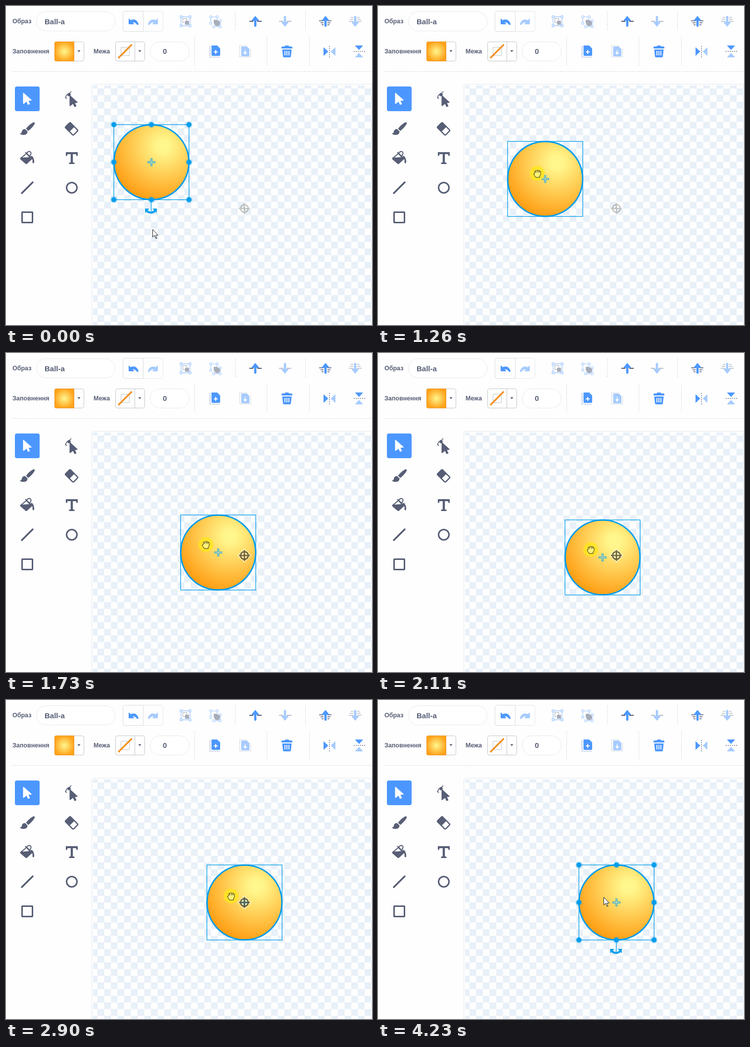
An HTML page for the animation above (4320 ms loop, 740 px wide and 646 px high).

```html
<!DOCTYPE html>
<html lang="uk">
<head>
<meta charset="utf-8">
<title>Centering a costume</title>
<style>
  html, body { margin: 0; width: 100%; height: 100%; overflow: hidden; background: #fefefe; }
  svg { display: block; }
  text { font: bold 12.5px "Liberation Sans", Arial, sans-serif; fill: #575e75; }
  .value { font-size: 15px; }
  .field { fill: #fff; stroke: #e6e9ee; }
  .button { fill: none; stroke: #c4c6ca; }
  .dashed { fill: none; stroke: #d6d8dc; stroke-dasharray: 3 2; }
  .ink { fill: #575e75; }
  .line { fill: none; stroke: #575e75; stroke-width: 3; }
  .blue { fill: #4c97ff; }
  .pale { fill: #a6cbff; }
  .guide { fill: none; stroke: #009dec; }
</style>
</head>
<body>
<svg width="740" height="646" viewBox="0 0 740 646">
  <defs>
    <pattern id="checks" patternUnits="userSpaceOnUse" x="482" y="410" width="27" height="27">
      <path d="M0 0H13.5V27H27V13.5H0Z" fill="#e8f0f8"/>
    </pattern>
    <radialGradient id="swatch">
      <stop offset="0" stop-color="#fff78f"/><stop offset="1" stop-color="#ffa41c"/>
    </radialGradient>
    <radialGradient id="shade" gradientUnits="userSpaceOnUse" cx="24" cy="-33" r="115">
      <stop offset="0" stop-color="#fff88e"/><stop offset=".12" stop-color="#fff58a"/>
      <stop offset="1" stop-color="#ff9c12"/>
    </radialGradient>
    <marker id="handle" markerUnits="userSpaceOnUse" markerWidth="16" markerHeight="16" viewBox="-8 -8 16 16">
      <circle r="7" fill="#009dec" opacity=".25"/><circle r="5" fill="#009dec"/>
    </marker>
    <path id="up" d="M0-11 7-2.5Q7.5-1 6-1H2.3V9Q2.3 11 0 11T-2.3 9V-1H-6Q-7.5-1-7-2.5Z"/>
    <path id="undo" d="M248 26.5Q248 25 249.3 26L252 28.7Q263 23.5 268 36Q268 39.5 265 38Q261 32.5 256 33L258.5 35.5Q259.5 37 258 37H249Q248 37 248 36Z"/>
    <path id="caret" d="M-3-2H3L0 2Z" fill="#575e75"/>
    <path id="pointer" d="M.5.5V16L4.1 12.6 6.7 18.6H9.1L6.5 12.2H11.5Z"/>
    <path id="corners" d="M-11-11h4v4h-4zM7-11h4v4h-4zM-11 7h4v4h-4zM7 7h4v4h-4zM-7-9H7M-7 9H7M-9-7V7M9-7V7"/>
    <path id="crosshair" d="M-7.8 0A7.8 7.8 0 1 1 7.8 0A7.8 7.8 0 1 1-7.8 0M-11 0H11M0-11V11" fill="none"/>
    <g id="target">
      <use href="#crosshair" stroke="#fff" stroke-width="6" stroke-linecap="round" opacity=".6"/>
      <use href="#crosshair" stroke="#3c3a2c" stroke-width="2.7"/>
    </g>
  </defs>

  <!-- top bar, first row -->
  <text x="13" y="35">Образ</text>
  <rect class="field" x="61.5" y="11.5" width="159" height="39" rx="19.5"/>
  <text class="value" x="78" y="37">Ball-a</text>
  <path class="button" d="M277.5 10.5H241Q236.5 10.5 236.5 15V47Q236.5 51.5 241 51.5H277.5Z" style="stroke:#d9dbe0"/>
  <path class="button" d="M277.5 10.5H313Q317.5 10.5 317.5 15V47Q317.5 51.5 313 51.5H277.5" style="stroke:#e6e8ec"/>
  <use href="#undo" class="blue"/>
  <use href="#undo" class="pale" transform="matrix(-1 0 0 1 555 0)"/>

  <g transform="translate(363 31)">
    <use href="#corners" fill="#fff" stroke="#a6cbff" stroke-width="1.3"/>
    <rect x="-5.5" y="-5.5" width="8" height="8" fill="#fff" stroke="#a8adba"/>
    <path d="M-1-1H7V7H-1Z" fill="#a8adba"/>
  </g>
  <g transform="translate(423 31)" stroke="#a6cbff" stroke-width="1.2" fill="#fff">
    <path d="M-11-11h4v4h-4zM2-11h4v4h-4zM-11 2h4v4h-4zM-7-9H2M-9-7V2M4-7V-3M8-3h4v4h-4zM8 9h4v4h-4zM-5 9h4v4h-4zM-1 11H8M10 1V9"/>
    <path d="M-3-3H4V-2A6 6 0 1 1-2 4H-3Z" fill="#a8adba" stroke="none"/>
  </g>

  <g transform="translate(504 31)">
    <path d="M-12 0H-4M4 0H13" class="line" style="stroke-width:2"/><use href="#up" class="blue"/>
  </g>
  <g transform="translate(564 31)">
    <path d="M-12 0H-4M4 0H13" stroke="#b9bfcc" stroke-width="2"/><use href="#up" class="pale" transform="scale(1 -1)"/>
  </g>
  <g transform="translate(646 31)">
    <path d="M-13-1H-4M4-1H12M-10 3H-4M4 3H10M-8 7H-4M4 7H8" class="line" style="stroke-width:1.5"/>
    <use href="#up" class="blue"/>
  </g>
  <g transform="translate(706 31)">
    <path d="M-13 0H-4M4 0H13M-11-4H-4M4-4H11M-9-8H-4M4-8H9" stroke="#b9bfcc" stroke-width="1.5"/>
    <use href="#up" class="pale" transform="scale(1 -1)"/>
  </g>

  <!-- top bar, second row -->
  <text x="13" y="96">Заповнення</text>
  <rect class="button" x="98.5" y="72.5" width="59" height="39" rx="4"/>
  <path d="M138 72H102Q98 72 98 76V108Q98 112 102 112H138Z" fill="url(#swatch)"/>
  <path d="M137.500 72.500H102Q98.500 72.500 98.500 76V108Q98.500 111.500 102 111.500H137.500Z" fill="none" stroke="#e8901c"/>
  <use href="#caret" x="147.5" y="91.5"/>
  <text x="177" y="96">Межа</text>
  <rect class="button" x="221.5" y="72.5" width="59" height="39" rx="4"/>
  <path class="button" d="M260.5 72V112M232.5 83.5H249.5V100.5H232.5Z"/>
  <path d="M227 105.5 254.5 78" stroke="#f29022" stroke-width="3.2"/>
  <use href="#caret" x="270.5" y="91.5"/>
  <rect class="field" x="291.5" y="72.5" width="79" height="39" rx="19.5"/>
  <text class="value" x="317" y="97">0</text>

  <path class="blue" d="M416 80H427L433 86V99Q433 101 431 101H417.500Q415.500 101 415.500 99V80.500Z"/>
  <path d="M412.500 82V103.500H433" class="line" style="stroke:#6f8fc4;stroke-width:1.2;stroke-dasharray:2 1.500"/>
  <path d="M420 93H428M424 89V97" stroke="#fff" stroke-width="2"/>
  <path class="pale" d="M477 82H487L492 87V101Q492 102 491 102H477Q475.500 102 475.500 101V83Q475.500 82 477 82Z"/>
  <path d="M487 80.500H472.500V103.500H494.500V86" class="line" style="stroke:#bcc3d2;stroke-width:1.2;stroke-dasharray:2 1.500"/>
  <path d="M483.500 89V95M481 94.500H486L483.500 97.500Z" stroke="#fff" stroke-width="1.500" fill="#fff"/>
  <path class="blue" d="M557 84Q557 82 559 82H563L565 80H571L573 82H577Q579 82 579 84V86H557ZM558.5 88H577.5L576 102Q575.8 104 574 104H562Q560.2 104 560 102Z"/>
  <path d="M564 91V100M568 91V100M572 91V100" stroke="#fff" stroke-width="1.8"/>
  <path class="blue" d="M642 83.5V101L651.5 92.2ZM705.5 80H722L713.8 89Z"/>
  <path class="pale" d="M666 83.5V101L656.5 92.2ZM705.5 104H722L713.8 95Z"/>
  <path d="M654 81V104M703 92H726" stroke="#8f95a5" stroke-width="2" stroke-dasharray="2 2.2"/>

  <path class="dashed" d="M463.5 11V51M605.5 11V51M381.5 63V120M527.5 63V120M613.5 63V120M13 132.5H740"/>

  <!-- tools -->
  <rect class="blue" x="18" y="163" width="50" height="50" rx="4"/>
  <path d="M34.5 177Q34.5 175 36 176.2L51.5 190Q52.5 191.3 51 191.5L45.5 192 48.5 198.5 44.5 200.3 41.5 193.8 36.3 197.8Q34.5 199 34.5 197Z" fill="#fff"/>
  <path class="ink" d="M128.5 182Q128.5 180 130 181.2L144.5 194.5Q145.5 195.8 144 196L139.5 196.5 142.5 203 138.5 204.8 135.5 198.3 130.3 202.3Q128.5 203.5 128.5 201.5Z"/>
  <path d="M121 186Q121 179 127 178.5M127 178 132 173M119.5 185 123 188" class="line" style="stroke-width:1.5"/>
  <circle cx="127.5" cy="179.5" r="3.3" class="ink"/>

  <path class="ink" d="M57 235.5Q59 236.5 57.5 239.5 52 248 45 253L40.5 248.5Q46 241 53.5 236.5 56 235 57 235.5ZM39 249.5 43.5 254Q43.5 261 36 261 31 261.5 28 258.5 32 257.5 32 254 34 248.5 39 249.5Z"/>
  <g transform="rotate(45 133 248.5)">
    <rect class="line" x="121.5" y="242" width="23" height="14" rx="2" style="stroke-width:2.5"/>
    <path class="ink" d="M121 241H134V257H121Z"/>
  </g>
  <path class="ink" d="M28.5 308 42 297 54 309 42.5 319.5Q41 320.5 39.5 319.5L29 310.5ZM52 303Q57.5 308 57 317 56 320 53.5 317 54.5 310 50 305Z"/>
  <path d="M33 307 42 299.5 48 306Z" fill="#fff"/>
  <path d="M39 296 49 307M41 299Q46 292 50 296 52 299 47 305" class="line" style="stroke-width:2"/>
  <path class="ink" d="M121 296H145V303.5H142.5L141.5 300H135.2V316.5L138.5 317.5V320H127.5V317.5L130.8 316.5V300H124.5L123.5 303.5H121Z"/>
  <path class="line" d="M32 379 54 357" stroke-linecap="round" style="stroke-width:3.5"/>
  <circle class="line" cx="133" cy="368" r="10.5"/>
  <rect class="line" x="32.5" y="417.5" width="21" height="21" rx=".5"/>

  <!-- drawing area -->
  <path d="M173.5 646V163Q173.5 158.5 178 158.5H740" fill="none" stroke="#e3e7ed"/>
  <rect x="176" y="161" width="564" height="485" fill="url(#checks)"/>
  <use href="#target" x="482" y="410" opacity=".28"/>

  <circle id="ball" r="76" fill="url(#shade)"/>
  <g id="selection">
    <circle class="guide" r="75.8" stroke-width="3"/>
    <rect class="guide" x="-76" y="-76" width="152" height="152" stroke-width="1.3"/>
    <path class="guide" d="M-8 0H8M0-8V8" stroke-width="4" opacity=".8"/>
    <path d="M-7 0H7M0-7V7" stroke="#d6dfae" stroke-width="1.3"/>
    <g id="handles">
      <path class="guide" d="M-.5 76V100" stroke-width="1.3"/>
      <path class="guide" d="M-9 99Q-1 105.5 7 99" stroke-width="4"/>
      <path d="M-13 94H-4.5L-12.5 103ZM11 94H2.5L10.5 103Z" fill="#009dec"/>
      <path d="M-76-76H0H76V0V76H0H-76V0Z" fill="none" marker-start="url(#handle)" marker-mid="url(#handle)"/>
    </g>
  </g>
  <use id="highlight" href="#target" x="482" y="410"/>

  <g id="cursor" fill="#fff">
    <circle id="press" r="15" fill="#ffe520" opacity=".85"/>
    <use id="point" href="#pointer" stroke="#1c1c1c"/>
    <path id="grab" d="M-3 8-7 2Q-7.5-.5-5 0V-4Q-4-6.5-2.5-5-1-8 1-5.5 3-7.5 4-5 7-5.5 7-2V2L5 5V8ZM-2.5-5V-1.5M1-5.5V-1.5M4-5V-1.5" stroke="#2a2610"/>
  </g>
</svg>
<script>
const LOOP = 4320, PRESS = 790, RELEASE = 3680;
const CENTER = [482, 410];
const $ = id => document.getElementById(id);

// The picture only refreshes at these moments, in ms.
const range = (start, step, count) => Array.from({ length: count }, (_, i) => start + i * step);
const moments = [0, ...range(90, 81.5, 7), ...range(PRESS, 77.6, 22), 2740, 2900, RELEASE, 4070, 4230];

// Tracks of [time, x, y].
const ballTrack = [
  [790, 294, 316.3], [1023, 304, 324], [1255.6, 338, 350.2], [1488, 391, 382], [1721, 429, 404],
  [1799, 434.5, 407.5], [2109, 454, 414], [2342, 472, 414], [2419, 477, 414], [2740, 482.2, 410]
];
const cursorTrack = [
  [0, 296, 452], [170, 292, 428], [420, 273, 328], [579, 268, 301], [790, 268, 301],
  [1023, 281, 309], [1255.6, 322, 339], [1488, 369, 368], [1721, 404, 388], [1799, 409, 391],
  [2109, 430, 398], [2342, 447, 399], [2419, 452, 399], [2740, 453, 397], [2900, 455, 397],
  [3680, 455, 397], [4070, 456, 397], [4230, 456, 399]
];

function at(track, time) {
  const next = track.findIndex(key => key[0] > time);
  if (next < 0) return track[track.length - 1].slice(1);
  if (next === 0) return track[0].slice(1);
  const [t0, x0, y0] = track[next - 1], [t1, x1, y1] = track[next];
  const k = (time - t0) / (t1 - t0);
  return [x0 + (x1 - x0) * k, y0 + (y1 - y0) * k];
}

const place = (id, [x, y]) => $(id).setAttribute('transform', `translate(${x} ${y})`);
const show = (id, visible) => $(id).setAttribute('display', visible ? 'inline' : 'none');

function draw(now) {
  const elapsed = now % LOOP;
  const time = moments.filter(m => m <= elapsed).pop();
  const ball = at(ballTrack, time);
  const pressed = time >= PRESS && time < RELEASE;
  const dragging = pressed && time > PRESS;

  place('ball', ball);
  place('selection', ball);
  place('cursor', at(cursorTrack, time));
  $('cursor').setAttribute('fill', pressed ? '#fff27a' : '#fff');
  show('handles', !pressed);
  show('press', pressed);
  show('grab', dragging);
  show('point', !dragging);

  const distance = Math.hypot(ball[0] - CENTER[0], ball[1] - CENTER[1]);
  const nearness = Math.min(1, Math.max(0, (90 - distance) / 30));
  $('highlight').setAttribute('opacity', pressed ? 0.75 * nearness : 0);
}

const start = performance.now();
function tick() {
  draw(performance.now() - start);
  requestAnimationFrame(tick);
}
tick();
</script>
</body>
</html>
```
